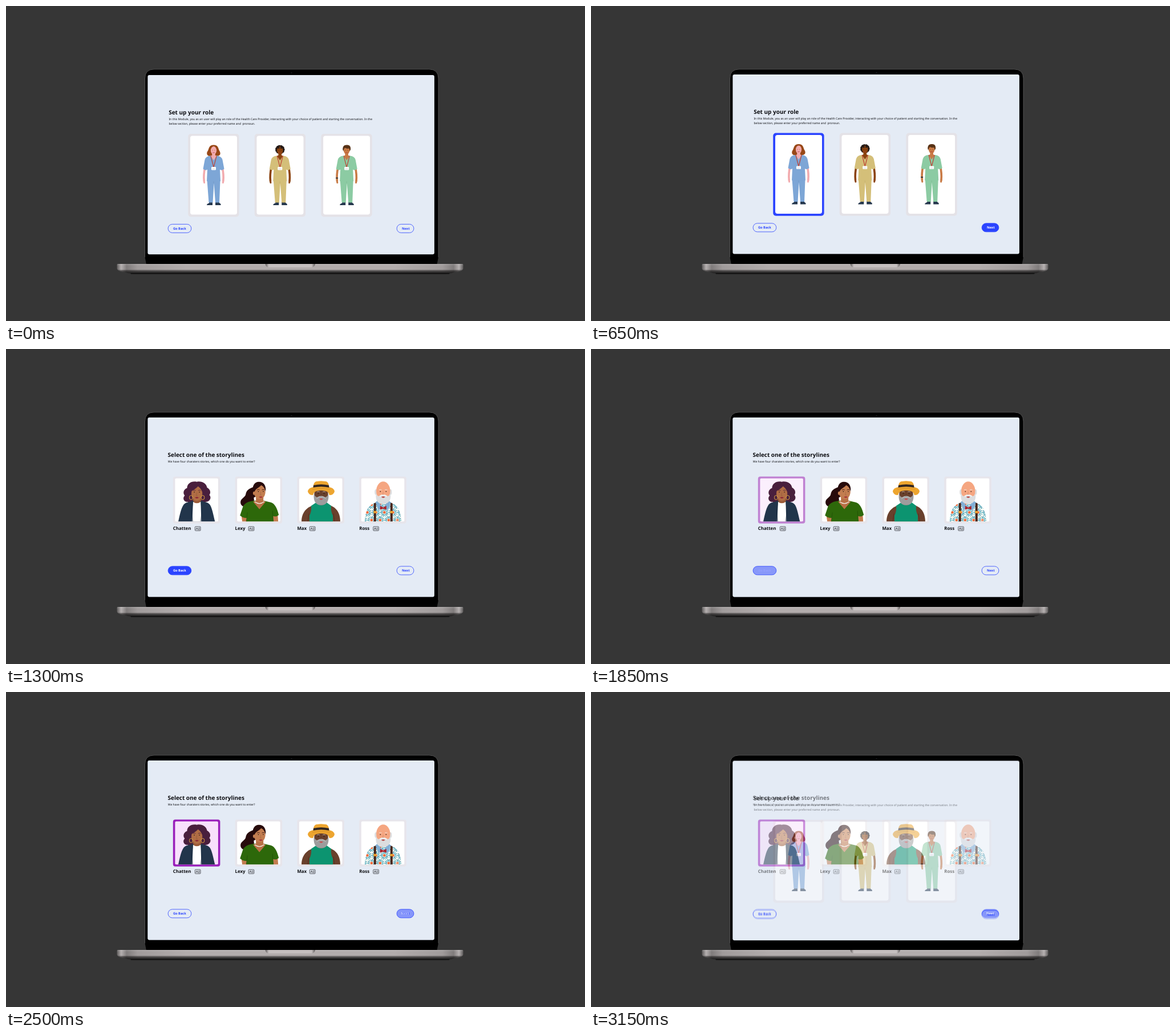
Write an HTML page that moves like this. It is 1015 by 552 pixels and loops after 3250 ms.

```html
<!DOCTYPE html>
<html lang="en">
<head>
<meta charset="utf-8">
<title>Role and storyline setup</title>
<style>
  html, body { margin: 0; width: 100%; height: 100%; overflow: hidden; background: #363636; }
  #stage { display: block; width: 100vw; height: 100vh; }
  text { font-family: "Noto Sans", "Open Sans", sans-serif; white-space: pre; text-rendering: geometricPrecision; }
</style>
</head>
<body>
<svg id="stage" viewBox="0 0 1015 552"></svg>
<script>
const BLUE = '#2b44ff', INK = '#0b0c10', NAVY = '#25374d', CARD = '#e4e2e7';
const STEP = 650, HOLD = 550;

const box = (x, y, w, h, r, fill, extra = '') =>
  `<rect x="${x}" y="${y}" width="${w}" height="${h}" rx="${r}" fill="${fill}" ${extra}/>`;
const oval = (x, y, rx, ry, fill, extra = '') =>
  `<ellipse cx="${x}" cy="${y}" rx="${rx}" ry="${ry}" fill="${fill}" ${extra}/>`;
const shape = (d, fill) => `<path d="${d}" fill="${fill}"/>`;
const line = (d, color, width = 1) =>
  `<path d="${d}" fill="none" stroke="${color}" stroke-width="${width}" stroke-linecap="round" stroke-linejoin="round"/>`;
const label = (x, y, size, str, fill = INK, weight = 400) =>
  `<text x="${x}" y="${y}" font-size="${size}" font-weight="${weight}" fill="${fill}">${str}</text>`;
const move = (x, y, content) => `<g transform="translate(${x} ${y})">${content}</g>`;
const curls = (n, cx, cy, rx, ry, r, fill) => Array.from({ length: n }, (_, i) => {
  const a = i / n * Math.PI * 2;
  return oval(cx + rx * Math.cos(a), cy + ry * Math.sin(a), r, r, fill);
}).join('');
const face = (x, y, gap, brow, lips) =>
  [-gap, gap].map(dx => oval(x + dx, y, 0.9, 0.8, '#24150f') +
    line(`M${x + dx - 2} ${y - 3}q2 -1.3 4 0`, brow, 0.8)).join('') +
  line(`M${x} ${y + 1}l-1 5h2`, '#0003', 0.7) +
  shape(`M${x - 3.4} ${y + 9.5}q3.4 -2 6.8 0q-3.4 3.4 -6.8 0`, lips);

function laptop() {
  const lid = 'M243.500 440V127Q243.500 110.800 260 110.800H741.500Q758 110.800 758 127V440';
  const base = 'M196 452H800Q801.500 452 801.500 454V460Q801 464 792 465.500H204Q195 464 194.500 460V454Q194.500 452 196 452Z';
  return `<defs>
    <linearGradient id="metal">
      <stop offset="0" stop-color="#5d5b5b"/><stop offset=".012" stop-color="#b5b0b0"/>
      <stop offset=".028" stop-color="#807c7c"/><stop offset=".06" stop-color="#a09b9b"/>
      <stop offset=".2" stop-color="#b2acac"/><stop offset=".8" stop-color="#b2acac"/>
      <stop offset=".94" stop-color="#a09b9b"/><stop offset=".972" stop-color="#807c7c"/>
      <stop offset=".988" stop-color="#b5b0b0"/><stop offset="1" stop-color="#5d5b5b"/>
    </linearGradient>
    <linearGradient id="shade" x2="0" y2="1">
      <stop offset="0" stop-color="#fff" stop-opacity=".15"/><stop offset=".25" stop-color="#fff" stop-opacity="0"/>
      <stop offset=".7" stop-color="#000" stop-opacity="0"/><stop offset=".85" stop-color="#000" stop-opacity=".4"/>
      <stop offset="1" stop-color="#000" stop-opacity=".7"/>
    </linearGradient>
    <linearGradient id="notch">
      <stop offset="0" stop-color="#5e5a5a"/><stop offset=".07" stop-color="#c4bebe"/>
      <stop offset=".93" stop-color="#c4bebe"/><stop offset="1" stop-color="#5e5a5a"/>
    </linearGradient>
  </defs>` +
    box(0, 0, 1015, 552, 0, '#363636') +
    shape(lid + 'L755.500 452.500H246Z', '#000') + line(lid, '#505050', 1) +
    oval(500.5, 117, 1.2, 1.2, '#141518') +
    shape('M205 464H790Q782 469.500 770 469.700H226Q212 469.500 205 464Z', '#292828') +
    line('M219 468.800H777', '#080808', 1.2) +
    shape(base, 'url(#metal)') + shape(base, 'url(#shade)') +
    shape('M454.500 452H542Q541 457.800 535 458H461Q455.500 457.800 454.500 452Z', 'url(#notch)');
}

function button(x, w, str, textX, filled) {
  return box(x, 380.8, w, 15, 7.5, filled ? BLUE : 'none', `stroke="${BLUE}" stroke-width=".8"`) +
    label(textX, 390.3, 5.7, str, filled ? '#fff' : BLUE, 600);
}
const buttons = (back, next, nextX = 694) =>
  button(284.1, 40.7, 'Go Back', 293, back) + button(685.1, 29.8, 'Next', nextX, next);

function nurse(cx, skin, cloth, hair, hairBack, hairFront) {
  return move(cx, 242,
    hairBack +
    line('M-15 38Q-18 52 -16.800 63M15 38Q18 52 16.800 63', skin, 3.6) +
    line('M-16.800 63l.4 3M16.800 63l-.4 3', skin, 3) +
    shape('M-8 99H-2V105.500H-12Q-12 103 -8 102ZM3 99H9Q9 101 12.500 103.500V105.500H3Z', NAVY) +
    shape('M-11.500 62H11.500L10 101H3L.500 67L-1.500 101H-8.500Z', cloth) +
    shape('M-6 19Q-14 20 -15.500 26L-18.500 42Q-14 45.500 -11 43L-12 63.500H12L11 43Q14 45.500 18.500 42L15.500 26Q14 20 6 19Z', cloth) +
    line('M0 67V64', '#0002', 0.5) +
    shape('M-2.800 13H2.800V18L5 19.500L0 27L-5 19.500L-2.800 18Z', skin) +
    line('M-5 19.500L0 39L5 19.500', '#bd4334', 1.2) +
    box(-4, 38.5, 8, 5.3, 0.8, '#fff') + line('M-2 41.800H2', '#b8bcc4', 0.6) +
    oval(0, 9.5, 5.1, 7, skin) +
    oval(-2, 9.2, 0.5, 0.5, hair) + oval(2, 9.2, 0.5, 0.5, hair) +
    line('M-1.500 13.300Q0 14.300 1.500 13.300', '#a8323a', 0.7) +
    hairFront);
}

function nurses() {
  const auburn = '#984817', black = '#241a17', brown = '#573216';
  return nurse(364, '#f2abae', '#7da6d6', auburn,
      shape('M0 0C8 0 8 6 10 10C14 16 10 20 5 19H-5C-11 21 -14 15 -10 10C-8 6 -8 0 0 0Z', auburn),
      shape('M2 2C-4 2 -6 7 -5.500 12C-8 5 -4 1 1 1C6 1 8 7 6 12C6 8 4 4 2 2Z', auburn)) +
    nurse(480.3, '#8b430f', '#d4bf79', black,
      curls(11, 0, 8, 5.6, 5.2, 2.7, black),
      curls(6, 0, 3.5, 4.4, 1.6, 1.6, black)) +
    nurse(597.2, '#c97a45', '#8ccba3', brown,
      oval(0, 7, 6.4, 6.5, brown),
      shape('M-6.500 10C-8 2 -4 -.5 1 0C6 0 8 4 6.500 10L5 6Q0 7 -3 5L-5 7Z', brown) +
      box(-19, 57, 4, 2, 0.8, '#30343b'));
}

function roleScene(selected) {
  const cards = [319.2, 435.7, 552.3].map((x, i) =>
    box(x, 222.5, 89.4, 145.3, 5, selected && i === 0 ? BLUE : CARD) +
    box(x + 3.8, 226, 82, 138, 4, '#fff')).join('');
  return label(285.2, 188.9, 10, 'Set up your role', INK, 600) +
    label(285.4, 198.9, 5.09, 'In this Module, you as an user will play an role of the Health Care Provider, interacting with your choice of patient and starting the conversation. In the') +
    label(285.4, 206.8, 5.09, 'below section, please enter your preferred name and  pronoun.') +
    cards + nurses() + buttons(false, selected);
}

// Portraits are drawn in a 75.5 unit square that clips them.
function curlyWoman() {
  const hair = '#491f3d', skin = '#b06d45', gold = '#d9a441';
  return shape('M38 6C47 4 55 9 56 16C62 19 63 25 60 29C65 34 60 41 54 41Q51 45 46 43H30Q25 45 22 41C16 42 12 35 17 30C13 26 15 19 21 17C21 9 29 4 38 6Z', hair) +
    shape('M31 36H46V46H31Z', '#9b5b38') +
    shape('M5.500 76C8 66 10 53 15 46Q18 42 26 41L32 39L38 76ZM70 76C67 64 65 52 61 46Q58 42 51 41L45 39L38 76Z', '#22354b') +
    shape('M31.500 41Q38 46 45 41L46 76H30Z', '#fff') +
    line('M31 42L29 58L31 75M45.500 42L47 58L45 75', '#17273a', 0.6) +
    oval(38.2, 26, 9.6, 13.5, skin) +
    shape('M27 24C28 12 35 8 41 11C48 12 50 20 49 26C46 20 44 16 40 14C36 19 31 20 27 24Z', hair) +
    face(38.2, 24, 4.5, hair, '#8c2635') +
    oval(28, 33.5, 3, 3.8, 'none', `stroke="${gold}"`) + oval(48.5, 33.5, 3, 3.8, 'none', `stroke="${gold}"`);
}

function ponytailWoman() {
  const hair = '#270b0c', skin = '#c37d50';
  return shape('M30 15C21 17 16 21 15 28C14 34 5 35 6 43C7 51 18 52 23 47C28 44 31 39 29 34L35 30V16Z', hair) +
    shape('M7 62H18V76H9ZM62 62H71L72 76H64Z', skin) +
    shape('M31 39C20 40 13 43 10 50L5 65Q11 70 17 69L16 76H64L63 66Q69 68 73 64C70 52 66 44 59 42L46 39Z', '#2d680a') +
    shape('M33 30H46V39L50 41L39 54L28 41L33 39Z', '#b87045') +
    line('M31 41Q39 47 47 41', '#f4eee5', 1.3) +
    oval(39.5, 23.5, 10, 13, skin) +
    shape('M28 25C25 13 31 6 38 6C47 6 51 13 50 23C48 16 45 13 42 12C38 17 32 17 30 25Z', hair) +
    oval(29.5, 26, 1.8, 3, skin) + face(41.5, 23, 4.3, hair, '#a5343a') +
    line('M18 60L16 75M62 57L63 74', '#1f4c08', 0.7);
}

function hatMan() {
  const skin = '#69402c', straw = '#eda52f', grey = '#9d9c9d';
  return shape('M4 76C4 64 9 54 20 49L30 44H48L58 49C68 54 72 64 72 76Z', skin) +
    shape('M21 48L30 42Q39 52 48 42L56 48Q55 58 59 65V76H18V65Q22 58 21 48Z', '#0c9470') +
    line('M17 62L15 75M60 62L62 75', '#482a1c', 0.7) +
    oval(38.5, 28, 12.2, 15, skin) +
    shape('M26 27Q28 33 32 33Q38.500 28 45 33Q49 33 51 27C53 39 48 47 38.500 47C29 47 24 39 26 27Z', grey) +
    face(38.5, 26.5, 5, '#c3c0bf', '#c84d4d') +
    line('M31 35Q35 31 38.500 33Q42 31 46 35', '#b9b7b7', 1.5) +
    shape('M15 23Q16 16 26 15H51Q61 16 62 23Q60 30 52.500 29Q52 21.500 38.500 21Q25 21.500 24.500 29Q17 30 15 23Z', straw) +
    shape('M24.500 17C25 8 27 5 33 5Q38 4 44 5C50 5 52 8 52.500 17Q38.500 19 24.500 17Z', straw) +
    shape('M25 12Q38.500 9 52 12L52.500 16Q38.500 13 24.500 16Z', '#302521') +
    line('M23 19Q38.500 16 54 19', '#c98320', 0.6);
}

function burst(x, y) {
  const rays = Array.from({ length: 14 }, (_, i) => {
    const a = i * Math.PI / 7, c = Math.cos(a), s = Math.sin(a);
    return line(`M${x + 3.6 * c} ${y + 3.6 * s}L${x + 7 * c} ${y + 7 * s}`, i % 3 ? '#2387a6' : '#55b6c4', 1.2);
  }).join('');
  return rays + oval(x, y, 2.4, 2.4, '#ed6a3c');
}

function beardedMan() {
  const skin = '#f5a681', white = '#dcdddf';
  const body = 'M6 76C7 59 11 48 22 44L31 39H46L55 44C65 48 69 59 71 76Z';
  let pattern = '';
  for (let row = 0; row < 3; row++)
    for (let col = 0; col < 6; col++)
      pattern += burst(3 + col * 15 + row % 2 * 7.5, 46 + row * 13.5);
  return `<clipPath id="shirt"><path d="${body}"/></clipPath>` +
    shape(body, '#fffdf5') + `<g clip-path="url(#shirt)">${pattern}</g>` +
    line('M18 61L14 76M60 61L63 76', '#f2eee3', 1) +
    shape('M22 44L26 42V76H22ZM51 42L55 44V76H51Z', '#49271d') +
    box(21.5, 57, 5, 4, 1, '#efa52f') + box(50.5, 57, 5, 4, 1, '#efa52f') +
    shape('M28 39L38.500 51L30 56L25 42ZM48 39L38.500 51L47 56L52 42Z', '#82afd6') +
    shape('M38.500 51L33 48V55L38.500 53L44 55V48Z', '#a9252d') +
    oval(26, 24, 2.6, 5, white) + oval(51, 24, 2.6, 5, white) +
    oval(38.5, 22, 12.2, 16.5, skin) +
    shape('M26 27Q29 33 33 30Q38.500 27 44 30Q48 33 51 27C53 38 48 45 38.500 45C29 45 24 38 26 27Z', white) +
    face(38.5, 23, 5, '#eeeeef', '#b84b48') +
    line('M33 31Q36 28.500 38.500 30Q41 28.500 44 31', '#f5f5f5', 2);
}

function idIcon(x) {
  return box(x, 311.2, 9.6, 7.2, 1, 'none', `stroke="${INK}" stroke-width=".65"`) +
    line(`M${x + 1.6} 316.600l1.700 -3.800l1.700 3.800m-.7 -1.300h-2M${x + 6} 313.500h2m-2 1.500h2m-2 1.500h2`, INK, 0.55);
}

const people = [
  { name: 'Chatten', icon: 331.4, draw: curlyWoman },
  { name: 'Lexy', icon: 425.2, draw: ponytailWoman },
  { name: 'Max', icon: 532.4, draw: hatMan },
  { name: 'Ross', icon: 643.8, draw: beardedMan }
];

function storyScene(selected, back, next) {
  const cards = people.map(({ name, icon, draw }, i) => {
    const x = 292.8 + i * 108.8, active = selected && i === 0;
    return box(x, 223.4, 82.6, 82.4, 4, active ? '#9a1fbb' : '#e7e5eb') +
      box(x + 3.6, 226.8, 75.5, 75.5, 2, active ? '#f8e0fc' : '#fff') +
      `<svg x="${x + 3.6}" y="226.8" width="75.5" height="75.5">${draw()}</svg>` +
      label(x, 317.3, 7.9, name, INK, 600) + idIcon(icon);
  }).join('');
  return label(283.6, 188.9, 9.95, 'Select one of the storylines', INK, 600) +
    label(283.8, 198.9, 5.07, 'We have four charaters stories, which one do you want to enter?') +
    cards + buttons(back, next, next ? 693 : 694);
}

const screen = (content, top = 120.1, shift = 0) =>
  `<g class="scene">${box(248.4, top, 502.5, 314.3, 3, '#e4ebf5')}${move(0, shift, content)}</g>`;

const stage = document.getElementById('stage');
stage.innerHTML = laptop() +
  screen(roleScene(false), 120.9, 1.6) +
  screen(roleScene(true)) +
  screen(storyScene(false, true, false)) +
  screen(storyScene(true, false, false)) +
  screen(storyScene(true, false, true));
const scenes = [...stage.querySelectorAll('.scene')];

// Each scene holds, then mixes evenly with the next one before the cut.
function render(now) {
  const time = now % (STEP * scenes.length);
  const current = Math.floor(time / STEP);
  const following = (current + 1) % scenes.length;
  const mixing = time % STEP >= HOLD;
  const upper = Math.max(current, following);
  scenes.forEach((scene, i) => {
    const shown = i === current || mixing && i === following;
    scene.style.display = shown ? '' : 'none';
    scene.style.opacity = mixing && i === upper ? 0.5 : 1;
  });
}

const start = performance.now();
function tick() {
  render(performance.now() - start);
  requestAnimationFrame(tick);
}
tick();
</script>
</body>
</html>
```
